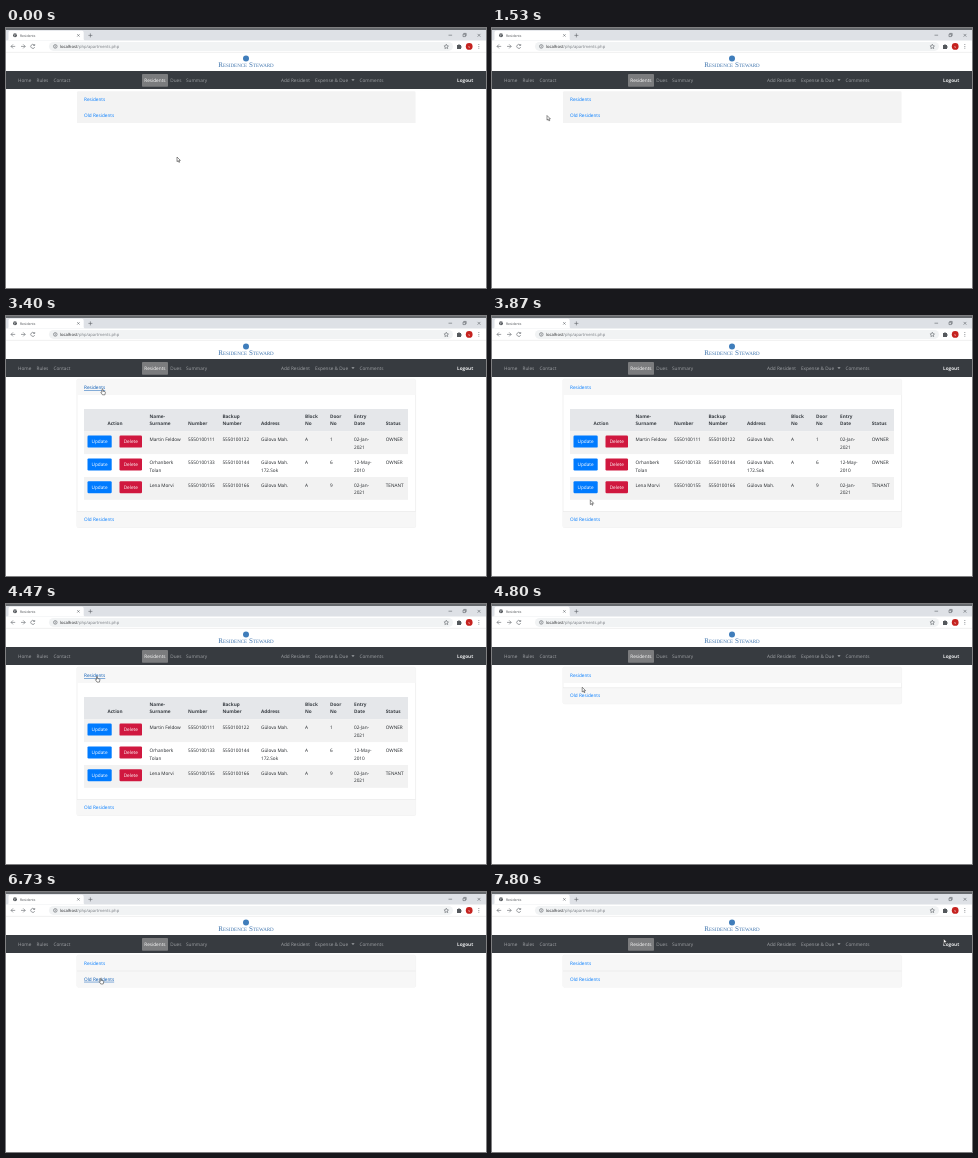
Recreate the animation shown at these times as an HTML page. Size 480x260 px, loop 7.87 s.

```html
<!DOCTYPE html>
<html lang="en">
<head>
<meta charset="utf-8">
<title>Residents</title>
<style>
html, body { margin: 0; width: 100%; height: 100%; overflow: hidden; background: #fff; }
#stage { display: block; width: 480px; height: 260px; }
text { font: 4.7px "Open Sans", sans-serif; fill: #212529; text-rendering: geometricPrecision; }
.nav text { fill: #a0a3a6; }
.nav .on { fill: #fff; font-weight: 500; }
.nav .bold { fill: #e8e9ea; }
.bold { font-weight: 700; }
.head { fill: #3b4046; }
.mid { text-anchor: middle; }
.white { fill: #fff; }
.link { fill: #007bff; }
.link.hover { fill: #0056b3; text-decoration: underline; }
.icon { fill: none; stroke: #5f6368; stroke-width: .6; }
.line { fill: none; stroke: #dcdcdc; stroke-width: .4; }
</style>
</head>
<body>
<svg id="stage" viewBox="0 0 480 260">
  <!-- browser window -->
  <rect width="480" height="12.5" fill="#dee1e6"/>
  <rect width="480" height="2" fill="#66696d"/>
  <path d="M1 12.5Q2.5 12.5 2.5 11V4.5Q2.5 2.8 4 2.8H76Q77.7 2.8 77.7 4.5V11Q77.7 12.5 79.2 12.5Z" fill="#fff"/>
  <circle cx="9" cy="7.3" r="2" fill="#54585c"/>
  <path d="M7.7 6.6L9 7.2L8.6 8.4M9.6 5.8L10.4 7" stroke="#fff" stroke-width=".5" fill="none"/>
  <text x="14" y="8.6" style="font-size:3.4px;fill:#45494d">Residents</text>
  <path class="icon" d="M71.2 6.2l2.4 2.4m0-2.4l-2.4 2.4M82.4 7.4h4m-2-2v4M442.5 7.2h3.6M457 6.2h2.4v2.4h-2.4zM457.8 6.2v-.8h2.4v2.4h-.8M471.6 5.9l2.8 2.8m0-2.8l-2.8 2.8"/>
  <path d="M0 24.4H480" class="line"/>
  <rect x="43" y="13.9" width="404" height="9" rx="4.5" fill="#f1f3f4"/>
  <path class="icon" d="M9.2 18.4H5m2-2l-2 2l2 2M15 18.4h4.2m-2-2l2 2l-2 2M28.4 17.2a2 2 0 1 0 .3 1.8M28.7 16v1.5h-1.5"/>
  <g class="icon"><circle cx="49.3" cy="18.4" r="1.8"/><path d="M49.3 18.1v1.3m0-2.3v.5"/></g>
  <text x="54" y="20" style="font-size:4.15px;fill:#777b80"><tspan fill="#202124">localhost</tspan>/php/apartments.php</text>
  <path class="icon" d="M440.3 16.2l.7 1.5l1.5.2l-1.1 1.1l.3 1.6l-1.4-.8l-1.4.8l.3-1.6l-1.1-1.1l1.5-.2z"/>
  <path d="M451 17h1.2a.8.8 0 0 1 1.6 0H455v1.2a.8.8 0 0 1 0 1.6V21h-4z" fill="#54585c"/>
  <circle cx="463.2" cy="18.4" r="3.4" fill="#c5221f"/>
  <text class="mid white" x="463.2" y="19.5" style="font-size:3.6px">s</text>
  <path d="M472.8 16.2v.8m0 1v.8m0 1v.8" stroke="#5f6368" stroke-width=".8"/>

  <!-- site header -->
  <circle cx="240" cy="30.6" r="3" fill="#3f7dbb"/>
  <text class="mid" x="240" y="38.9" style="font:7.1px 'Liberation Serif',serif;font-variant:small-caps;fill:#3f74ad">Residence Steward</text>
  <g class="nav" id="nav">
    <rect y="43" width="480" height="18" fill="#373b40"/>
    <rect x="136" y="46" width="26" height="12.7" rx=".8" fill="#7b7c7e"/>
    <path d="M345.4 51.3h3.2l-1.6 1.7z" fill="#a0a3a6"/>
  </g>

  <!-- accordion -->
  <rect id="card" x="71" y="63.3" width="338.6" rx="1.4" class="line"/>
  <path id="head1" fill="#f7f7f7" d="M71 79V64.7Q71 63.3 72.4 63.3H408.2Q409.6 63.3 409.6 64.7V79Z"/>
  <svg x="71" y="79" width="338.6" height="0" id="body1"><g id="table1" transform="translate(-71 -79)"/></svg>
  <text id="link1" class="link" x="78" y="73.3">Residents</text>
  <g id="lower">
    <path id="head2" fill="#f7f7f7" d="M71 79H409.6V95H71Z"/>
    <path id="divider" class="line" d="M71 79H409.6"/>
    <text id="link2" class="link" x="78" y="88.8">Old Residents</text>
    <svg x="71" y="95" width="338.6" height="0" id="body2"><g id="table2" transform="translate(-71 -95)"/></svg>
  </g>
  <path id="cursor" stroke="#222" stroke-width=".5" fill="#fff"/>
</svg>
<script>
const LOOP = 7870, STEP = 1000 / 15;
const BODY1 = 116.5, BODY2 = 44;
const ARROW = "M0 0V4.7L1.1 3.7L1.9 5.4L2.7 5.1L1.9 3.4H3.4Z";
const HAND = "M-.5 3V.4Q0-.3.5.4V2.2L2.6 2.7Q3 3 2.9 3.6L2.4 5.8H0L-1.7 3.4Q-1.4 2.6-.5 3.3Z";
// cursor stops: time, x, y
const PATH = [
  [0, 171, 129], [267, 95, 105], [533, 44.5, 98], [867, 45, 98], [1267, 45, 98],
  [1533, 55, 87.5], [1867, 62, 79], [2067, 62, 79], [2467, 96.5, 73], [3533, 96.5, 73],
  [3867, 98.3, 184], [4000, 97, 197], [4333, 91, 72.3], [4533, 91, 72.3], [4867, 90, 86],
  [5000, 90, 86], [5133, 94.8, 86.2], [6800, 94.8, 86.2], [7600, 391, 51], [7800, 451.5, 46.7]
];
const $ = id => document.getElementById(id);

function add(parent, tag, attrs, content = "") {
  const el = document.createElementNS("http://www.w3.org/2000/svg", tag);
  for (const key in attrs) el.setAttribute(key, attrs[key]);
  el.textContent = content;
  parent.append(el);
}

// "|" starts a new line
function label(parent, x, y, words, style = "") {
  words.split("|").forEach((line, i) => add(parent, "text", { x, y: y + i * 7.5, class: style }, line));
}

const box = (parent, x, y, width, height, fill, rx = 0) => add(parent, "rect", { x, y, width, height, fill, rx });

function button(parent, x, y, width, fill, word) {
  box(parent, x, y, width, 12, fill, 1.2);
  label(parent, x + width / 2, y + 7.8, word, "mid white");
}

[[12, "Home"], [30.5, "Rules"], [47.5, "Contact"], [138.3, "Residents", "on"], [164.3, "Dues"], [180, "Summary"],
 [275, "Add Resident"], [309, "Expense & Due"], [353.5, "Comments"], [451, "Logout", "bold"]]
  .forEach(([x, word, style]) => label($("nav"), x, 54, word, style));

function buildResidents(g) {
  const columns = [143.5, 182, 216.4, 255, 299, 324, 348, 379.7];
  const titles = ["Name-|Surname", " |Number", "Backup|Number", " |Address", "Block|No", "Door|No", "Entry|Date", " |Status"];
  const rows = [
    ["Martin Feldow", "5550100111", "5550100122", "Gülova Mah.", "A", "1", "02-Jan-|2021", "OWNER"],
    ["Orhanberk|Tolan", "5550100133", "5550100144", "Gülova Mah.|172.Sok", "A", "6", "12-May-|2010", "OWNER"],
    ["Lena Morvi", "5550100155", "5550100166", "Gülova Mah.", "A", "9", "02-Jan-|2021", "TENANT"]
  ];
  box(g, 78, 93, 324, 22.4, "#e5e7ea");
  label(g, 109, 109.3, "Action", "bold head mid");
  titles.forEach((title, i) => label(g, columns[i], 101.8, title, "bold head"));
  rows.forEach((row, r) => {
    const y = 115.4 + r * 22.8;
    box(g, 78, y, 324, 22.8, r % 2 ? "#fff" : "#f2f2f2");
    button(g, 81.5, y + 4.2, 24.2, "#007bff", "Update");
    button(g, 113.5, y + 4.2, 22.5, "#d0183f", "Delete");
    row.forEach((cell, i) => label(g, columns[i], y + 9.9, cell));
  });
}

function buildOldResidents(g) {
  const columns = [81.6, 133.5, 173, 226, 260, 292.3, 335.3, 376];
  const titles = ["Name-Surname", "Number", "Backup Number", "Block No", "Door No", "Entry Date", "Exit Date", "Status"];
  const cells = ["Old Ned", "5550100177", "5550100188", "A", "12", "01-Nov-2020", "02-Jan-2021", "OWNER"];
  box(g, 78, 100, 324, 17, "#e5e7ea");
  box(g, 78, 117, 324, 14.5, "#f2f2f2");
  columns.forEach((x, i) => {
    label(g, x, 110.2, titles[i], "bold head");
    label(g, x, 125.8, cells[i]);
  });
}

const clamp = v => Math.max(0, Math.min(1, v));
const ease = v => 1 - (1 - clamp(v)) ** 2;
const openness = (t, open, close, span) => ease((t - open) / span) - ease((t - close) / span);

function cursorAt(t) {
  const next = PATH.findIndex(p => p[0] > t);
  if (next < 0) return PATH[PATH.length - 1].slice(1);
  const [t0, x0, y0] = PATH[next - 1], [t1, x1, y1] = PATH[next];
  const k = (t - t0) / (t1 - t0);
  return [x0 + (x1 - x0) * k, y0 + (y1 - y0) * k];
}

function draw(t) {
  const h1 = BODY1 * openness(t, 2878, 4520, 350);
  const h2 = BODY2 * openness(t, 5270, 6540, 195);
  const untouched = t < 2800;
  $("body1").setAttribute("height", h1);
  $("body2").setAttribute("height", h2);
  $("lower").setAttribute("transform", `translate(0 ${h1})`);
  $("card").setAttribute("height", 31.7 + h1 + h2);
  for (const id of ["head1", "head2"]) $(id).style.fill = untouched ? "#f3f3f3" : "#f7f7f7";
  for (const id of ["card", "divider"]) $(id).style.opacity = untouched ? 0 : 1;

  const [x, y] = cursorAt(t);
  const over = (top, right) => x > 78 && x < right && y > top && y < top + 7.5;
  const hover1 = over(67.5, 99.5), hover2 = over(83 + h1, 108.5);
  $("link1").classList.toggle("hover", hover1);
  $("link2").classList.toggle("hover", hover2);
  $("cursor").setAttribute("d", hover1 || hover2 ? HAND : ARROW);
  $("cursor").setAttribute("transform", `translate(${x} ${y})`);
}

function tick() {
  const t = performance.now() % LOOP;
  draw(Math.floor((t + 4) / STEP) * STEP);
  requestAnimationFrame(tick);
}

buildResidents($("table1"));
buildOldResidents($("table2"));
tick();
</script>
</body>
</html>
```
